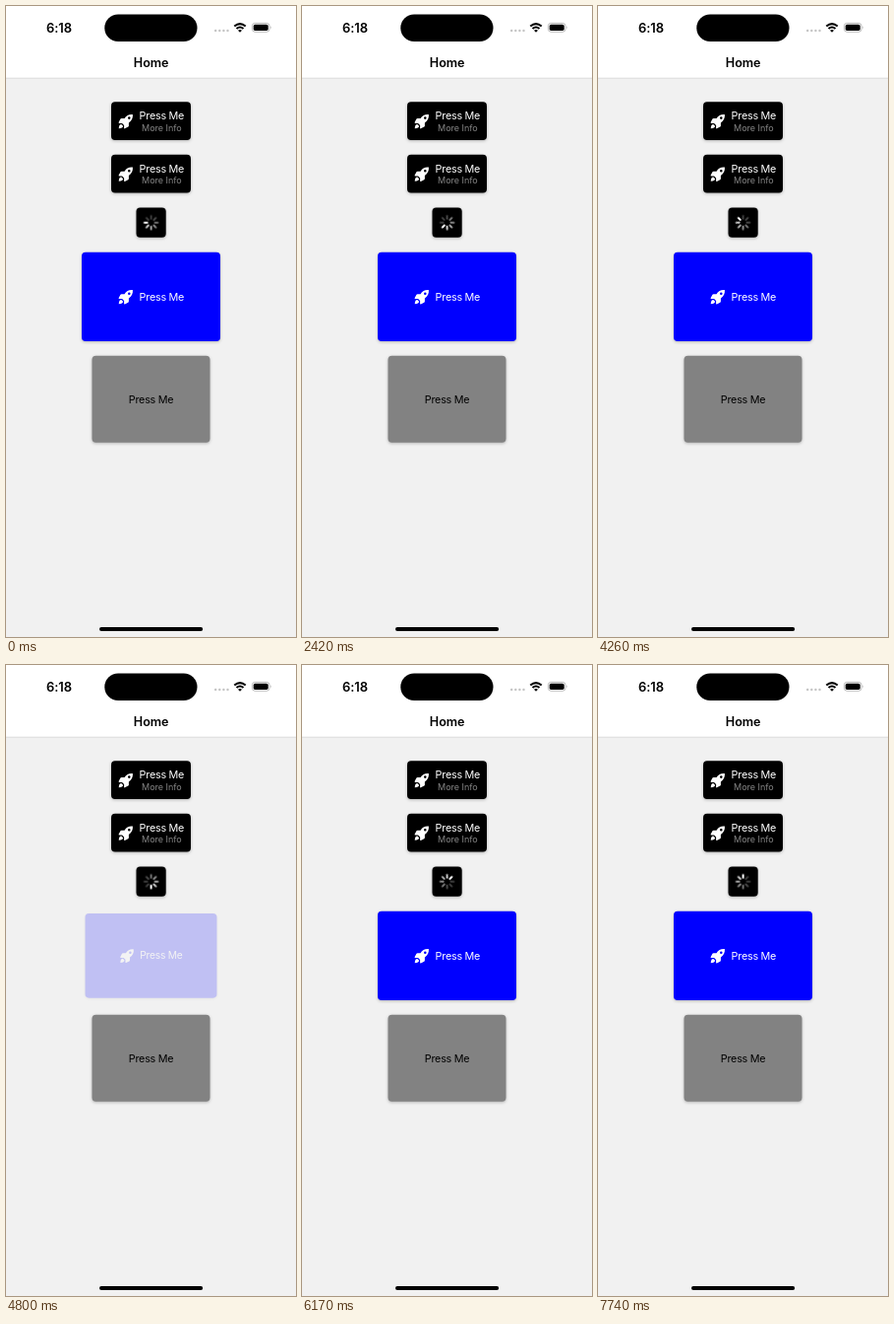
Write an HTML page that moves like this. It is 295x640 px and loops after 7870 ms.

```html
<!DOCTYPE html>
<html lang="en">
<head>
<meta charset="utf-8">
<title>Press Me</title>
<style>
  html, body { margin: 0; width: 100%; height: 100%; overflow: hidden; background: #f1f1f1; }
  svg { display: block; width: 100%; height: 100%; font-family: Inter, Roboto, sans-serif; }
  text { text-anchor: middle; }
  .bar { font-weight: 600; letter-spacing: -.1px; }
  .label { font-size: 10.8px; letter-spacing: -.25px; }
  .info { font-size: 9px; fill: #858585; }
  .card { filter: drop-shadow(0 1.5px 1.5px rgba(0, 0, 0, .25)); }
  .light { fill: #fff; }

  #spinner { animation: spin 7870ms steps(76) infinite; }
  #pressed {
    transform-origin: 147.5px 294.8px;
    animation: press 7870ms ease-out infinite;
  }
  @keyframes spin {
    from { transform: rotate(0deg); }
    to { transform: rotate(3420deg); }
  }
  @keyframes press {
    0%, 58.2% { opacity: 1; transform: scale(1); }
    60.2%, 62.3% { opacity: .2; transform: scale(.95); }
    64.8%, 100% { opacity: 1; transform: scale(1); }
  }
</style>
</head>
<body>
<svg viewBox="0 0 295 640" preserveAspectRatio="none">
  <defs>
    <g id="rocket" fill="#fff">
      <path fill-rule="evenodd" d="M7.2-7.2C3.5-7.6.9-6.2-1.2-3.1H-4.2Q-5-3.1-5.4-2.4L-7.1.9Q-7.3 1.6-6.6 1.7H-3.6L-1.6 3.7V6.7Q-1.4 7.4-.8 7.1L2.5 5.4Q3.2 5 3.2 4.2V1.2C6.2-.9 7.6-3.5 7.2-7.2ZM4.9-3.6A1.3 1.3 0 1 1 2.3-3.6A1.3 1.3 0 1 1 4.9-3.6Z"/>
      <path d="M-4.4 2.7Q-6.8 2.7-7 7Q-2.7 6.8-2.6 4.5Z"/>
    </g>
    <g id="infoButton">
      <rect class="card" x="107" y="97.2" width="81" height="38.8" rx="4"/>
      <use href="#rocket" x="121.7" y="117.2"/>
      <text class="label light" x="158.4" y="115">Press Me</text>
      <text class="info" x="158.4" y="126.6">More Info</text>
    </g>
  </defs>

  <rect width="295" height="640" fill="#f1f1f1"/>
  <rect width="295" height="73" fill="#fff"/>
  <path d="M0 73.2H295" stroke="#d9d9d9" stroke-width=".8"/>

  <text class="bar" x="54" y="26.6" font-size="13">6:18</text>
  <rect x="100.3" y="8.5" width="94.2" height="27.6" rx="13.8"/>
  <path d="M213.2 25H226" stroke="#c4c4c4" stroke-width="2.4" stroke-linecap="round" stroke-dasharray="0 4.1"/>
  <g fill="none" stroke="#000" stroke-width="2">
    <path d="M232.3 20.6Q238 15.6 243.7 20.6"/>
    <path d="M234.5 23Q238 20 241.5 23"/>
  </g>
  <path d="M238 26.8L236 24.7Q238 23.2 240 24.7Z"/>
  <rect x="250.4" y="17.4" width="17.6" height="8.8" rx="2.8" fill="none" stroke="#a8a8a8" stroke-width=".8"/>
  <rect x="251.7" y="18.7" width="15" height="6.2" rx="1.7"/>
  <path d="M269 20.3Q270.3 21.8 269 23.3Z" fill="#a8a8a8"/>
  <text class="bar" x="147.6" y="61.6" font-size="12.6">Home</text>

  <use href="#infoButton"/>
  <use href="#infoButton" y="53.6"/>

  <rect class="card" x="132.5" y="204.6" width="30.2" height="30.2" rx="4"/>
  <g transform="translate(147.6 219.7)">
    <g id="spinner" stroke="#fff" stroke-width="1.8" stroke-linecap="round"></g>
  </g>

  <g id="pressed">
    <rect class="card" x="77" y="249.7" width="141" height="90.2" rx="4" fill="#00f"/>
    <use href="#rocket" x="121.7" y="295.3"/>
    <text class="label light" x="158.4" y="298.7">Press Me</text>
  </g>

  <rect class="card" x="87.5" y="354.8" width="120" height="88" rx="4" fill="#828282"/>
  <text class="label" x="147.6" y="402.6">Press Me</text>

  <rect x="95" y="630" width="105.2" height="4" rx="2"/>
</svg>
<script>
  const spinner = document.getElementById("spinner");
  const spokes = 8, head = 6;
  for (let i = 0; i < spokes; i++) {
    const spoke = document.createElementNS("http://www.w3.org/2000/svg", "path");
    spoke.setAttribute("d", "M0-3.9V-6.8");
    spoke.setAttribute("transform", `rotate(${(head - i) * 360 / spokes})`);
    spoke.setAttribute("opacity", Math.max(.26, 1 - i * .14));
    spinner.append(spoke);
  }
</script>
</body>
</html>
```
